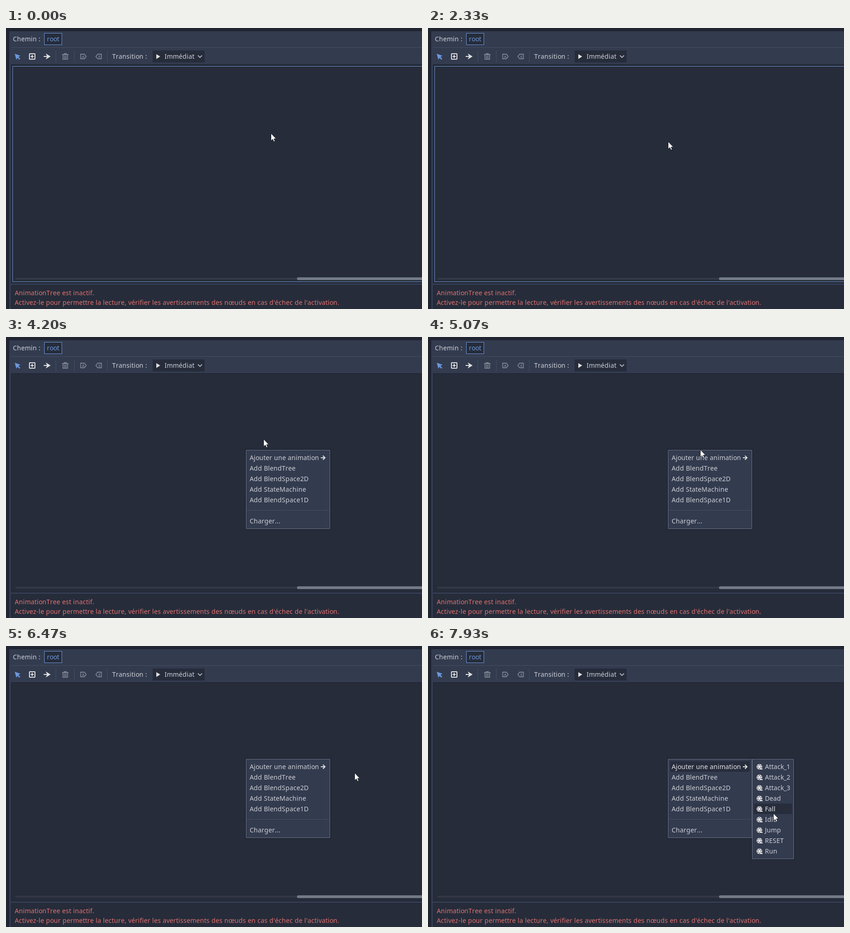
Animation, 905 px wide and 612 px high, one loop 8 s. Source, as an HTML page:

```html
<!DOCTYPE html>
<html lang="fr">
<head>
<meta charset="utf-8">
<title>AnimationTree</title>
<style>
  html, body { margin: 0; width: 100%; height: 100%; overflow: hidden; background: #202531; }
  svg { display: block; width: 905px; height: 612px; }
  text { font: 14px "Noto Sans", "Open Sans", sans-serif; fill: #cdcfd5; white-space: pre; }
  .accent { fill: #6c97da; }
  .error { fill: #e0716f; }
  .lit { fill: #e2e4e8; }
  .mini { font-size: 7.5px; font-weight: bold; fill: #7c8290; text-anchor: middle; }
  .panel { fill: #333b4f; }
  .dark { fill: #262c3a; }
  .popup { fill: #333b4f; stroke: #6b7283; }
  .shade { fill: none; stroke: #10131b; stroke-opacity: .16; stroke-width: 4; }
  .hover { fill: #282d3c; }
  .line { stroke: #474e61; fill: none; }
  .icon { fill: #e0e0e0; }
  .stroke { fill: none; stroke: #e0e0e0; stroke-width: 2; }
  .dim { fill: none; stroke: #7c8290; stroke-width: 1.8; }
</style>
</head>
<body>
<svg viewBox="0 0 905 612" xmlns="http://www.w3.org/2000/svg">
  <defs>
    <g id="reel">
      <path class="icon" d="M0 6H7V4H4Z"/>
      <circle class="icon" r="6.1"/>
      <g class="panel" id="holes"></g>
    </g>
    <path id="tag" class="dim" d="M-6 -5H2L6 0L2 5H-6Z"/>
  </defs>

  <rect width="905" height="612" fill="#202531"/>
  <rect class="panel" x="7" y="7" width="900" height="606"/>
  <path class="line" d="M11 42.5H905M108.5 49V75M148.5 49V75M220.5 49V75"/>
  <rect class="dark" x="83.5" y="11.5" width="38" height="25" stroke="#6c97da"/>
  <rect class="dark" x="319" y="49" width="113" height="26"/>

  <!-- toolbar icons -->
  <path class="accent" d="M19 56L31.5 60.5L27 63L31 67L29 69L25 65L22.5 69Z"/>
  <rect class="stroke" x="51" y="56" width="12" height="12" rx="1"/>
  <path class="stroke" d="M57 58.5V65.5M53.5 62H60.5"/>
  <path class="icon" d="M86.5 55.5L97 62L86.5 68.5L89 63H82V61H89Z"/>
  <path class="dim" d="M122 58H136M126.5 57V56H131.5V57M124 59V68.2H134V59M127.5 60V67M130.5 60V67"/>
  <use href="#tag" x="168.5" y="62"/>
  <use href="#tag" transform="translate(201.5 62) scale(-1 1)"/>
  <text class="mini" x="168" y="65">A</text>
  <text class="mini" x="203" y="65">E</text>
  <path class="icon" d="M327 57L335.5 62L327 67.5Z"/>
  <path class="stroke" d="M417.5 59.7L422 64.2L426.5 59.7" style="stroke:#adb2bc"/>

  <!-- graph area and message box -->
  <rect class="dark" x="11.5" y="79.5" width="900" height="476" stroke="#1d222d"/>
  <rect x="20" y="544" width="900" height="4" rx="2" fill="#323846"/>
  <rect x="633" y="543" width="290" height="6" rx="3" fill="#737a87"/>
  <rect id="focus" x="14.5" y="83.5" width="900" height="469" fill="none" stroke="#6c93cd"/>
  <rect class="dark" x="11.5" y="560.5" width="900" height="60" stroke="#1f2430"/>
  <g id="labels"></g>

  <g id="menu">
    <rect class="shade" x="521" y="245" width="185" height="174"/>
    <rect class="popup" x="522.5" y="246.5" width="182" height="171"/>
    <path class="line" d="M524 377.5H703"/>
    <rect id="menuRow" class="hover" x="527" width="173" height="23"/>
    <path class="stroke" d="M685 263H693.5M689.5 258.5L694 263L689.5 267.5"/>
  </g>
  <g id="sub">
    <rect class="shade" x="704" y="245" width="93" height="220"/>
    <rect class="popup" x="705.5" y="246.5" width="90" height="217"/>
    <rect id="subRow" class="hover" x="709" width="83" height="23"/>
  </g>
  <path id="pointer" d="M0 0V16.2L3.7 12.8L6.2 18.2L8.7 17.1L6.3 11.8H11.2Z" fill="#fff" stroke="#14161c" stroke-width=".9"/>
</svg>

<script>
const NS = 'http://www.w3.org/2000/svg';
const $ = id => document.getElementById(id);
const LOOP = 8000, STEP = 1000 / 15;
const ROW = 23, ROW_TOP = 251;

function add(parent, tag, attrs) {
  const el = document.createElementNS(NS, tag);
  for (const k in attrs) el.setAttribute(k, attrs[k]);
  return parent.appendChild(el);
}

// Text is laid out with whole-pixel advances, as the editor's hinted font does.
const ruler = document.createElement('canvas').getContext('2d');
ruler.font = '14px "Noto Sans", "Open Sans", sans-serif';

function label(parent, str, x, y, cls = '') {
  const xs = [];
  for (const ch of str) {
    xs.push(x);
    x += Math.round(ruler.measureText(ch).width);
  }
  const el = add(parent, 'text', { x: xs.join(' '), y, class: cls });
  el.textContent = str;
  return el;
}

const labels = $('labels');
label(labels, 'Chemin :', 15, 29);
label(labels, 'root', 89, 29, 'accent');
label(labels, 'Transition :', 231, 67);
label(labels, 'Immédiat', 345, 67);
label(labels, 'AnimationTree est inactif.', 19, 582, 'error');
label(labels, "Activez-le pour permettre la lecture, vérifier les avertissements des nœuds en cas d'échec de l'activation.", 19, 603, 'error');

const rowY = i => ROW_TOP + i * ROW;
const list = (menu, x, names) => names.map((s, i) => label(menu, s, x, rowY(i) + 17));
const menuItems = list($('menu'), 530,
  ['Ajouter une animation', 'Add BlendTree', 'Add BlendSpace2D', 'Add StateMachine', 'Add BlendSpace1D', '', 'Charger...']);
const subItems = list($('sub'), 733,
  ['Attack_1', 'Attack_2', 'Attack_3', 'Dead', 'Fall', 'Idle', 'Jump', 'RESET', 'Run']);

for (let i = 0; i < 6; i++) {
  const a = (i + 0.5) * Math.PI / 3;
  add($('holes'), 'circle', { cx: 4 * Math.cos(a), cy: 4 * Math.sin(a), r: 1.1 });
}
subItems.forEach((_, i) => add($('sub'), 'use', { href: '#reel', x: 721, y: rowY(i) + 12 }));

// Pointer moves: start, duration, end point
const HOME = [576, 229];
const moves = [
  [1600, 200, 548, 217],
  [2070, 260, 522, 247],
  [3330, 600, 551, 263],
  [3930, 270, 560, 222],
  [4470, 800, 598, 249],
  [5330, 200, 589, 264],
  [6070, 400, 758, 276],
  [6530, 340, 680, 264],
  [7470, 460, 751, 364]
];
const MENU_AT = 3130;
const subOpen = [[3998, 4130], [5660, 6260], [7060, LOOP]];

function pointerAt(t) {
  let [x, y] = HOME;
  for (const [at, span, toX, toY] of moves) {
    const p = Math.min(1, Math.max(0, (t - at) / span));
    const e = p * p * (3 - 2 * p);
    x += (toX - x) * e;
    y += (toY - y) * e;
  }
  return [Math.round(x), Math.round(y)];
}

const show = (el, on) => el.setAttribute('visibility', on ? 'inherit' : 'hidden');

// Pass row -1 for no highlight.
function highlight(bar, items, row) {
  show(bar, row in items);
  bar.setAttribute('y', rowY(row));
  items.forEach((el, i) => el.setAttribute('class', i === row ? 'lit' : ''));
}

function draw(ms) {
  const t = Math.floor((ms % LOOP + 4) / STEP) * STEP % LOOP;
  const [x, y] = pointerAt(t);
  const row = Math.floor((y - ROW_TOP) / ROW);
  const menu = t >= MENU_AT;
  const sub = subOpen.some(([a, b]) => t >= a && t < b);

  show($('focus'), !menu);
  show($('menu'), menu);
  show($('sub'), sub);
  highlight($('menuRow'), menuItems, sub ? 0 : x < 705 ? row : -1);
  highlight($('subRow'), subItems, sub && x > 705 ? row : -1);
  $('pointer').setAttribute('transform', `translate(${x + 0.5} ${y + 0.5})`);
}

const start = performance.now();
function tick() {
  draw(performance.now() - start);
  requestAnimationFrame(tick);
}
tick();
</script>
</body>
</html>
```
